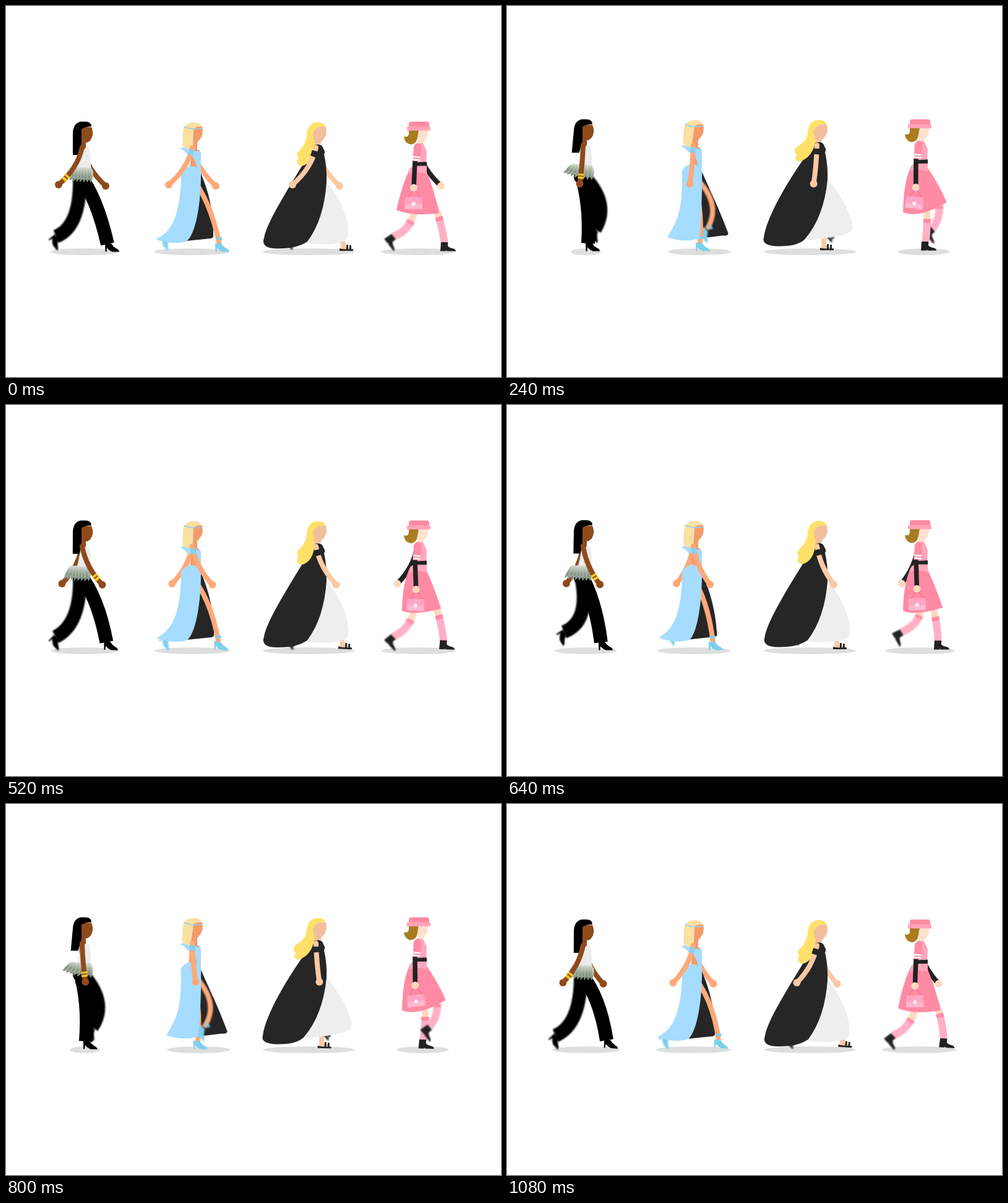
Recreate the animation shown at these times as an HTML page with a canvas. Size 800 by 600 pixels, loop 1.12 s.

```html
<!DOCTYPE html>
<html lang="en">
<head>
<meta charset="utf-8">
<title>Catwalk</title>
<style>
  html, body { margin: 0; width: 100%; height: 100%; overflow: hidden; background: #fff; }
  canvas { display: block; }
</style>
</head>
<body>
<canvas id="stage" width="800" height="600"></canvas>
<script>
const g = document.getElementById('stage').getContext('2d');
const LOOP = 1120, HALF = LOOP / 2;
const LEAD = 15; // the far leg runs slightly ahead of the half step
const DARK = '#262626', PINK = '#ff8aa4', SOFT = '#ffb0c6', BLUE = '#a5dcff';

// Leg pose: time, ankle x y, knee control x y, foot angle in degrees
const WALK = [
  [0, 164, 385, 147, 310, 0],
  [80, 154, 384, 144, 315, 0],
  [240, 131, 384, 135, 320, 0],
  [360, 114, 381, 129, 330, 24],
  [520, 80, 375, 122, 354, 46],
  [560, 79, 374, 119, 358, 50],
  [640, 92, 367, 136, 350, 60],
  [800, 139, 361, 167, 319, 52],
  [920, 155, 365, 167, 313, 22],
  [1080, 161, 382, 150, 311, 4]
];

function row(i) {
  const n = WALK.length, r = WALK[(i + n) % n];
  return [r[0] + LOOP * Math.floor(i / n), ...r.slice(1)];
}

// Smooth periodic interpolation through the poses
function pose(t) {
  let i = WALK.length - 1;
  while (WALK[i][0] > t) i--;
  const [a, b, c, d] = [-1, 0, 1, 2].map(k => row(i + k));
  const h = c[0] - b[0], u = (t - b[0]) / h;
  return [1, 2, 3, 4, 5].map(k => {
    const m0 = (c[k] - a[k]) / (c[0] - a[0]) * h;
    const m1 = (d[k] - b[k]) / (d[0] - b[0]) * h;
    const v = c[k] - b[k];
    return b[k] + u * (m0 + u * (3 * v - 2 * m0 - m1 + u * (m0 + m1 - 2 * v)));
  });
}

function fill(color, path) {
  g.fillStyle = color;
  g.fill(new Path2D(path));
}

function line(color, width, path) {
  g.strokeStyle = color;
  g.lineWidth = width;
  g.stroke(new Path2D(path));
}

function oval(color, x, y, rx, ry = rx) {
  g.fillStyle = color;
  g.beginPath();
  g.ellipse(x, y, rx, ry, 0, 0, 7);
  g.fill();
}

function at(x, y, angle, draw) {
  g.save();
  g.translate(x, y);
  g.rotate(angle);
  draw();
  g.restore();
}

// Part of a quadratic curve between parameters a and b
function cut(q, a, b) {
  const p = (s, t) => [0, 1].map(k =>
    (1 - s) * (1 - t) * q[k] + (s + t - 2 * s * t) * q[k + 2] + s * t * q[k + 4]);
  return `M${p(a, a)}Q${p(a, b)} ${p(b, b)}`;
}

const HEEL = 'M-4 -1H6Q9 4 14 7Q19 9 19 12.5H8Q2 10 -1 6L-1.5 12.5H-3.5Z';

const shoes = {
  heel: () => fill('#000', HEEL),
  strap() {
    fill('#7dd0ec', HEEL);
    fill('#7dd0ec', 'M-2 -11H7V-7H-2Z');
  },
  sandal() {
    fill('#fbc9a4', 'M0 -2H7V4Q15 6 17 9H-1Z');
    fill(DARK, 'M-3 7Q2 9 19 8V11H-3ZM8 1H11V9H8ZM13 2H16V9H13Z');
  },
  boot: () => fill('#222', 'M-3 -3H8V3Q10 6 16 7Q21 8 21 11.5H7L5 10V11.5H-4Z')
};

// Motion values: bob (b), sway (s), near arm progress (u), time (t)
const models = [
  {
    x: 0, skin: '#8f4a1c', leg: '#000', width: 22, knee: 0, shift: 0, shoe: 'heel',
    shadow: c => [127.5, 39.5 + 17 * c],
    front({ s, u }) {
      oval('#000', 119, 280, 11);
      fill('#ececec', 'M127 228L134 230Q138 242 137 266H113Q119 250 120 232Z');
      fill(this.skin, 'M121 196H138Q141 203 140 209Q137 221 129 221V229L125 233L120 230Z');
      fill('#000', `M138 195Q138 187 128 187H121Q109 189 108 205L${108 - 3.5 * s} 241` +
        `H${119 - 2.5 * s}L122 222V199Q128 195 138 195Z`);
      const shade = g.createLinearGradient(0, 0, 0, 20);
      shade.addColorStop(0, '#d6ddd2');
      shade.addColorStop(1, '#6d7e6a');
      for (let k = 0; k < 15; k++) {
        const f = k < 8 ? k / 7 : (k - 7.5) / 7;
        const y = k < 8 ? 265 : 261;
        const leaf = 'M-3 0H3Q6 10 0 20Q-6 10 -3 0Z';
        at(109 + 28 * f - 4 * u * (1 - s), y, (1 - f) * (.6 + .55 * s), () => {
          fill(shade, leaf);
          line('rgba(235,240,232,.4)', .7, leaf);
        });
      }
    },
    sleeve(q) {
      line('#f7c91b', 9, cut(q, .72, .77) + cut(q, .8, .86));
    }
  },
  {
    x: 178, skin: '#ffa978', leg: '#ffa978', width: 8, knee: 4, shift: 3, shoe: 'strap',
    shadow: c => [306 - 5.5 * c, 56 + 5.5 * c],
    back({ s }) {
      fill(DARK, `M311 262C${324 - 2 * s} 290 ${336 + 5 * s} 325 ${335 + 24 * s} ${373 - s}` +
        `Q${334 + 23 * s} 376 ${330 + 20 * s} ${376 - s}L${291 + 18 * s} 380L300 300Z`);
    },
    front({ s }) {
      fill('#f59a68', 'M301 234L314 236L312 264H296Q300 250 299 236Z');
      fill(BLUE, 'M303 236Q300 230 312 233L315 237V266H309Q308 252 301 244Z');
      fill(BLUE, `M291 262Q298 256 310 262L315 264C316 320 ${306 + 7 * s} ${372 - 10 * s} ` +
        `${291 + 21 * s} ${381 - s}Q${268 + 18 * s} 387 ${242 + 18 * s} ${377 + s}` +
        `C${268 + 6 * s} ${366 - 14 * s} ${280 + 3 * s} 340 283 283Q280 266 291 262Z`);
      fill(BLUE, 'M281 231Q288 226 296 230L303 236Q297 243 293 240Q289 233 281 231Z');
      fill('#f59a68', 'M298 195H317Q320 208 313 216L309 221V232L314 235L300 234L298 222Z');
      fill('#fbe0a2', `M316 195Q314 188 303 188Q288 189 286 203L${285.5 - 1.5 * s} ${226 - 2 * s}` +
        `Q${288 - 3 * s} 232 ${302 - 4 * s} 232L303 199Q308 194 316 195Z`);
      line('#8fd0f0', 1.6, 'M287 195Q302 201 317 198');
      line('#8fb8d0', 1, 'M304 208V210M304 213V215M305 218V220');
    },
    sleeve(q) {
      line('#86cff0', 8, cut(q, .04, .18));
    }
  },
  {
    x: 378, skin: '#fbc9a4', leg: '#fbc9a4', width: 8, knee: 0, shift: 3, shoe: 'sandal',
    shadow: () => [489.5, 74.5],
    front({ s }) {
      fill('#eee', `M515 280C${535 + 2 * s} 305 ${553 + s} 335 ${553 + 6 * s} ${366 - 7 * s}` +
        `Q${555 + 5 * s} ${380 - 11 * s} ${538 + 4 * s} ${383 - 9 * s}Q515 ${388 - 9 * s} 485 383L500 300Z`);
      fill(DARK, 'M499 224Q511 222 513 231Q517 236 514 240Q519 262 518 285' +
        `Q${514 - 2 * s} 345 ${487 - 6 * s} 381Q468 394 432 392Q${412 - s} 390 ${417 - 2 * s} ${375 + 3 * s}` +
        `C${422 - 3 * s} 347 ${462 - 11 * s} 287 499 224Z`);
      fill('#f2bf9d', 'M494 195H517Q520 207 514 215Q510 219 509 220V223L499 225L495 215Z');
      fill('#ffe169', `M516 195Q515 188 503 188Q488 189 486 207Q486 222 ${474 - 7 * s} ${234 - 2 * s}` +
        `Q${467 - 5 * s} 240 ${473 - 5 * s} 245Q${466 - 4 * s} ${256 - 2 * s} ${478 - 5 * s} ${259 - 4 * s}` +
        `Q${498 - 5 * s} ${254 - 5 * s} 499 222L497 214V203Q502 194 516 195Z`);
      oval('#f2bf9d', 498.5, 208, 3);
    },
    sleeve(q) {
      line(DARK, 10, cut(q, .08, .22));
    }
  },
  {
    x: 542, skin: '#fdd9c0', leg: '#fdd9c0', width: 11, knee: 9, shift: 3, shoe: 'boot',
    socks: true, cuff: '#222',
    shadow: c => [670 - 4 * c, 51 + 10 * c],
    front({ s, u, b, t }) {
      const left = 631 + 9 * Math.min(1, u + s);
      const right = 700 + 11 * s + 3 * u * (1 - s);
      fill(PINK, `M654 261Q641 285 ${left} ${330 + 3 * u * (1 - s) + 8 * s}` +
        `Q${658 + 8 * s} ${341 + 7 * s} ${right} ${335 - 5 * u - 12 * s}` +
        `Q${692 + 8 * s} ${296 - 2 * s} 677 261Z`);
      fill('#fde0cf', 'M665 200H682Q683 213 675 219L674 224H665Z');
      fill('#ffa6bc', 'M662 222H674L680 235L679 254H660Z');
      fill('#ffa6bc', 'M659 258H680V272Q667 266 651 271Q653 261 659 258Z');
      fill('#222', 'M660 253L680 252V258.5H660Z');
      fill('#a97c20', 'M651 200H667L665 212Q664 223 654 224Q644 222 643 211Q650 213 651 207Z');
      fill(PINK, 'M651 197V191Q651 187 655 187H680Q684 187 684 191V197Z');
      fill('#ffa4b9', 'M650 195H684Q686 195 686 197V201.5H648V197Q648 195 650 195Z');

      const hx = 659 + 4 * u, hy = 293 + (1 - s) * (1 + 5 * u) - b;
      const bx = 660.5 - 2.5 * Math.cos(2 * Math.PI * t / LOOP - .8);
      line('#222', 7.5, `M661 250L${hx} ${hy}`);
      fill(PINK, 'M659 227Q662 222 667 222Q672 224 671 231L669 251H657.5Z');
      fill('#fff', 'M658.3 242.5L669.5 243.5V246L658 245ZM658 247L669.3 248V250.5L657.7 249.5Z');
      at(bx, hy + 24.5, .1 * Math.sin(2 * Math.PI * t / LOOP), () => {
        line('#f5789a', 2, 'M-9 -9L-1 -21H2L11 -9');
        fill('#ffb8d0', 'M-13 -9H13L14.5 10H-14.5Z');
        fill('#ffa5c3', 'M-13 -9H13L14.5 1Q0 4 -14.5 1Z');
        oval('#fff', 0, 1.5, 2.8);
      });
      oval(this.skin, hx, hy, 6);
    }
  }
];

function arm(f, u, s, near) {
  const hx = 85 + 76 * u, hy = 289 + 2 * u + 1.5 * s;
  const q = [123, 229, 123 + .2 * (hx - 123), 263, hx, hy];
  at(f.x, 0, 0, () => {
    g.lineCap = 'round';
    line(f.cuff || f.skin, 8, cut(q, 0, 1));
    g.lineCap = 'butt';
    oval(f.skin, hx, hy, 6);
    if (near) f.sleeve(q);
  });
}

function leg(f, time, b) {
  const t = time % LOOP, [x, y, kx, ky, a] = pose(t);
  const q = [119, 274 + b, kx + f.knee, ky, x + f.shift, y];
  at(f.x, 0, 0, () => {
    g.filter = t > 500 && t < 880 ? 'blur(1px)' : 'none';
    line(f.leg, f.width, cut(q, 0, 1));
    if (f.socks) {
      const top = .68 - a * .002;
      line(SOFT, 12, cut(q, top, 1));
      line(PINK, 12, cut(q, top, top + .05));
    }
    at(x, y, a * Math.PI / 180, shoes[f.shoe]);
  });
}

function draw(t) {
  const c = Math.cos(2 * Math.PI * t / HALF), s = (1 - c) / 2, b = -4 * s;
  const u = 1 - Math.abs(t / HALF - 1);
  const motion = { t, s, b, u };
  g.fillStyle = '#fff';
  g.fillRect(0, 0, 800, 600);
  for (const f of models) {
    const [x, r] = f.shadow(c);
    oval('#dedede', x, 397.5, r, 5.5);
    at(0, b, 0, () => {
      arm(f, 1 - u, s, false);
      if (f.back) f.back(motion);
    });
    leg(f, t + HALF + LEAD, b);
    leg(f, t, b);
    at(0, b, 0, () => {
      f.front(motion);
      if (f.sleeve) arm(f, u, s, true);
    });
  }
}

function tick(now) {
  draw(Math.floor(now / 40) * 40 % LOOP);
  requestAnimationFrame(tick);
}

draw(0);
requestAnimationFrame(tick);
</script>
</body>
</html>
```
